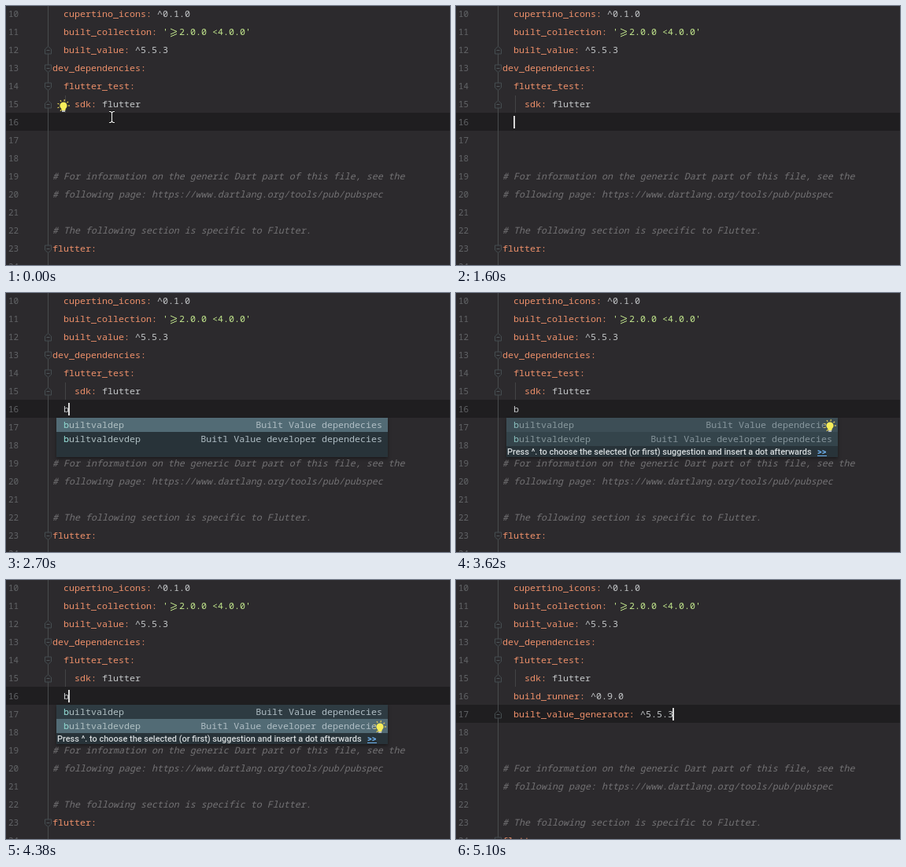
Recreate the animation shown at these times as an HTML page with a canvas. Size 564 by 330 pixels, loop 5.3 s.

```html
<!DOCTYPE html>
<html lang="en">
<head>
<meta charset="utf-8">
<title>Live template</title>
<style>
html, body { margin: 0; width: 564px; height: 330px; overflow: hidden; background: #2c2a2d; }
canvas { display: block; }
</style>
</head>
<body>
<canvas width="564" height="330"></canvas>
<script>
const LOOP = 5300, ROW = 23, CHAR = 7, LEFT = 59;
const MONO = '11.667px "Noto Sans Mono", "DejaVu Sans Mono", monospace';
const SANS = '10.95px Roboto, "Liberation Sans", sans-serif';
const BG = '#2c2a2d', KEY = '#ee906a', PLAIN = '#c5c8ca', STRING = '#c3e88d', COMMENT = '#737274';
const ctx = document.querySelector('canvas').getContext('2d');

// [indent, key, value]; a line without a key is a comment
const head = [
  [2, 'cupertino_icons:', '^0.1.0'],
  [2, 'built_collection:', "'  2.0.0 <4.0.0'"],
  [2, 'built_value:', '^5.5.3'],
  [0, 'dev_dependencies:', ''],
  [2, 'flutter_test:', ''],
  [4, 'sdk:', 'flutter']
];
const added = [
  [2, 'build_runner:', '^0.9.0'],
  [2, 'built_value_generator:', '^5.5.3']
];
const tail = [
  null, null,
  [0, '', '# For information on the generic Dart part of this file, see the'],
  [0, '', '# following page: https://www.dartlang.org/tools/pub/pubspec'],
  null,
  [0, '', '# The following section is specific to Flutter.'],
  [0, 'flutter:', '']
];

const rowY = n => 10 + (n - 10) * ROW;
const ramp = (t, a, b) => Math.min(1, Math.max(0, (t - a) / (b - a)));
const between = (t, a, b) => t >= a && t < b;

function text(str, x, y, color, font = MONO, align = 'left') {
  ctx.font = font;
  ctx.fillStyle = color;
  ctx.textAlign = align;
  ctx.fillText(str, x, y);
}

function rect(x, y, w, h, color) {
  ctx.fillStyle = color;
  ctx.fillRect(x, y, w, h);
}

function path(points, { fill, stroke, width = 1, close = false }) {
  ctx.beginPath();
  points.forEach(([x, y]) => ctx.lineTo(x, y));
  if (close) ctx.closePath();
  if (fill) { ctx.fillStyle = fill; ctx.fill(); }
  if (stroke) { ctx.strokeStyle = stroke; ctx.lineWidth = width; ctx.stroke(); }
}

function faded(alpha, draw) {
  if (alpha <= 0) return;
  ctx.save();
  ctx.globalAlpha = alpha;
  draw();
  ctx.restore();
}

function codeLine(line, n, keyColor = KEY) {
  if (!line) return;
  const [indent, key, value] = line, x = LEFT + indent * CHAR, y = rowY(n) + 4;
  if (!key) return text(value, x, y, COMMENT, 'italic ' + MONO);
  text(key, x, y, keyColor, '500 ' + MONO);
  text(value, x + (key.length + 1) * CHAR, y, value[0] === "'" ? STRING : PLAIN, '500 ' + MONO);
}

// Ligature for ">="
function atLeast(x, y) {
  path([[x, y - 4], [x + 8, y - .5], [x, y + 3]], { stroke: STRING });
  path([[x, y + 6], [x + 8, y + 2.5]], { stroke: STRING });
}

function foldMark(n, dir, fill) {
  const y = rowY(n) + .5, s = dir;
  path([[49.5, y - 4.5 * s], [57.5, y - 4.5 * s], [57.5, y + 1.5 * s], [53.5, y + 5 * s], [49.5, y + 1.5 * s]],
    { fill, stroke: '#454d50', close: true });
  path([[51.5, y], [55.5, y]], { stroke: '#50595c' });
}

function bulb(x, y) {
  for (let i = 0; i < 7; i++) {
    const a = Math.PI * (5 + i) / 6 + Math.PI / 6 * (i - 3) / 3, c = Math.cos(a), s = Math.sin(a);
    path([[x + 5.8 * c, y + 5.8 * s], [x + 8 * c, y + 8 * s]], { stroke: '#e6cf55', width: 1.2 });
  }
  ctx.beginPath();
  ctx.arc(x, y, 4.6, 0, 7);
  ctx.fillStyle = '#f7ee5a';
  ctx.fill();
  rect(x - 2.5, y + 3, 5, 3, '#f7ee5a');
  rect(x - 2, y + 6, 4, 2, '#b9bcbb');
}

function iBeam() {
  const points = [[131, 134.5], [133, 134.5], [134.5, 136], [134.5, 147], [133, 148.5], [131, 148.5]];
  for (const [stroke, width] of [['#111', 3], ['#eee', 1.2]]) {
    path(points, { stroke, width });
    path([[138, 134.5], [136, 134.5], [134.5, 136]], { stroke, width });
    path([[138, 148.5], [136, 148.5], [134.5, 147]], { stroke, width });
  }
}

function arrow() {
  path([[134, 137.5], [134, 151.5], [137, 148.7], [139.2, 153.6], [141.3, 152.7], [139.2, 148], [143.3, 148]],
    { fill: '#111', stroke: '#f2f2f2', close: true });
}

function popup(t) {
  ctx.save();
  ctx.shadowColor = 'rgba(0,0,0,.4)';
  ctx.shadowBlur = 4;
  ctx.shadowOffsetY = 2;
  rect(64, 159, 421, 50, '#283339');
  ctx.restore();
  if (t < 2660) return;

  const lead = ramp(t, 3520, 3620), settle = ramp(t, 3720, 3780);
  const first = t < 2680 ? 0 : 1 - .5 * lead - .35 * settle;
  const second = .3 * lead + .7 * settle;
  const dim = 1 - .35 * (lead - settle);
  [
    ['builtvaldep', 'Built Value dependecies', first],
    ['builtvaldevdep', 'Buitl Value developer dependecies', second]
  ].forEach(([name, note, weight], i) => {
    const y = 159 + i * 18;
    faded(weight, () => rect(64, y, 421, 18, '#526b75'));
    faded(dim, () => {
      text(name, 73, y + 13, '#b0c0c3');
      text('b', 73, y + 13, '#80cbc4');
      text(note, 478, y + 13, '#b0bec5', MONO, 'right');
    });
  });
  if (t >= 2720) {
    text('Press ^. to choose the selected (or first) suggestion and insert a dot afterwards', 65, 205.5, '#d5dadc', '500 ' + SANS);
    text('>>', 459, 205.5, '#6fb1ee', 'bold ' + SANS);
    rect(459, 207, 12, 1, '#6fb1ee');
  }
  faded(ramp(t, 3520, 3620) * (t < 3740), () => bulb(475, 169));
  faded(ramp(t, 4320, 4380), () => bulb(475, 187));
}

function caretX(t) {
  if (t < 1540) return 59;
  if (t < 1600) return 66;
  if (t < 2420) return 73;
  return t < 4540 ? 79 : 275;
}

function draw(t) {
  const done = t >= 4540, current = done ? 17 : 16;
  const highlight = '#1f1e20';
  rect(0, 0, 564, 330, BG);
  rect(0, rowY(current) - 12, 564, ROW, highlight);
  rect(53, 0, 1, 330, '#484b4d');
  rect(75, 114, 1, 22, '#434345');

  for (let n = 10; n <= 24; n++) text(n, 3, rowY(n) + 4, '#626467', MONO.replace('11.667', '11'));

  head.forEach((line, i) => codeLine(line, 10 + i));
  atLeast(209, rowY(11));
  if (done) added.forEach((line, i) => codeLine(line, 16 + i, t < 4580 ? PLAIN : KEY));
  else if (t >= 2420) text('b', 73, rowY(16) + 4, PLAIN, '500 ' + MONO);
  tail.forEach((line, i) => codeLine(line, current + 1 + i));

  foldMark(12, -1, BG);
  foldMark(13, 1, BG);
  foldMark(14, 1, BG);
  foldMark(15, -1, BG);
  if (t >= 5100) foldMark(17, -1, highlight);
  foldMark(done ? 24 : 23, 1, BG);

  if (t >= 240 && !between(t, 3320, 3920)) rect(caretX(t), rowY(current) - 8, 2, 16, '#d8d8d8');
  if (t < 240 || between(t, 1260, 1500)) faded(between(t, 1260, 1280) ? .9 : 1, () => bulb(73, 127));
  if (between(t, 2600, 4460)) popup(t);
  if (t < 300) iBeam();
  else if (t < 1500) arrow();
}

const start = performance.now();
function tick() {
  draw((performance.now() - start) % LOOP);
  requestAnimationFrame(tick);
}
tick();
</script>
</body>
</html>
```
